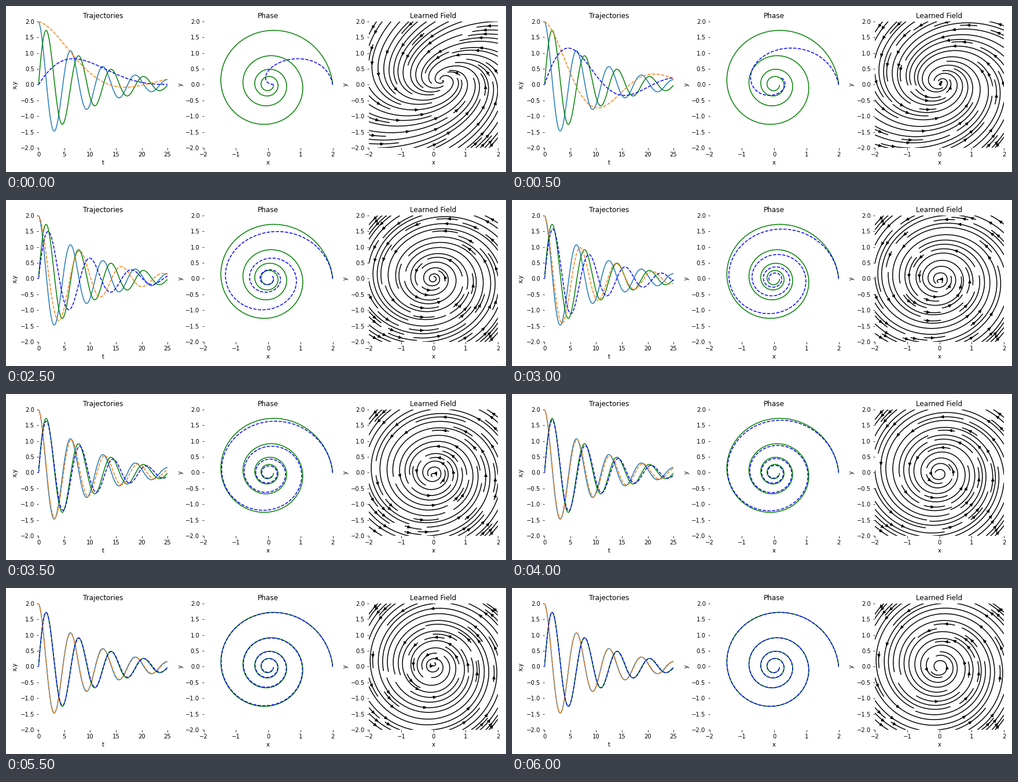
Recreate the animation shown at these times as a matplotlib script. Size 864 by 288 pixels, loop 6.5 s.

```python
import numpy as np
import matplotlib.pyplot as plt
from matplotlib.animation import FuncAnimation

plt.rcParams.update({
    "font.family": "DejaVu Sans",
    "font.size": 10,
    "axes.spines.left": False,
    "axes.spines.right": False,
    "axes.spines.top": False,
    "axes.spines.bottom": False,
})

FRAMES, INTERVAL = 13, 500
START = np.array([2.0, 0.0])
T = np.linspace(0, 25, 1000)

# Fit of the damped linear system as training goes on.
STEPS = np.array([0, 1, 3, 5, 7, 10, 12])
DECAY = [0.09, 0.087, 0.139, 0.103, 0.102, 0.102, 0.1]
OMEGA = [0.18, 0.288, 0.537, 0.779, 0.972, 0.993, 0.996]
CENTER_X = [0.28, 0.038, 0.034, 0, 0, 0, 0]
CENTER_Y = [0.15, 0.078, -0.01, 0, -0.01, 0.008, 0]
SIN_X = [0.62, 0.25, 0.2, 0.08, 0.03, 0.01, 0]
SIN_Y = [1.37, 1.68, 1.785, 1.82, 1.92, 1.985, 2]


def smooth(values, step):
    """Monotone cubic interpolation of values over STEPS."""
    v = np.asarray(values, float)
    h = np.diff(STEPS)
    d = np.diff(v) / h
    slope = np.zeros_like(v)
    slope[0], slope[-1] = d[0], d[-1]
    for k in range(1, len(v) - 1):
        if d[k - 1] * d[k] > 0:
            slope[k] = 2 * d[k - 1] * d[k] / (d[k - 1] + d[k])
    i = min(np.searchsorted(STEPS, step, side="right") - 1, len(h) - 1)
    u = (step - STEPS[i]) / h[i]
    return ((1 + 2 * u) * (1 - u) ** 2 * v[i]
            + u * (1 - u) ** 2 * h[i] * slope[i]
            + u ** 2 * (3 - 2 * u) * v[i + 1]
            + u ** 2 * (u - 1) * h[i] * slope[i + 1])


def system(decay, omega, center, sines):
    """Return the path from START and the matrix of the linear field."""
    mix = np.column_stack([START - center, sines])
    basis = np.exp(-decay * T) * np.array([np.cos(omega * T), np.sin(omega * T)])
    path = center[:, None] + mix @ basis
    spin = np.array([[-decay, -omega], [omega, -decay]])
    return path, mix @ spin @ np.linalg.inv(mix)


def learned(step):
    decay, omega, cx, cy, sx, sy = (
        smooth(p, step)
        for p in (DECAY, OMEGA, CENTER_X, CENTER_Y, SIN_X, SIN_Y))
    center = np.array([cx, cy])
    path, matrix = system(decay, omega, center, np.array([sx, sy]))
    return path, matrix, center


def style(ax, title, xlabel, ylabel, xlim):
    ax.set_title(title)
    ax.set_xlabel(xlabel)
    ax.set_ylabel(ylabel)
    ax.set_xlim(*xlim)
    ax.set_ylim(-2, 2)
    ax.set_yticks(np.arange(-2, 2.1, 0.5))


fig, (ax_traj, ax_phase, ax_field) = plt.subplots(
    1, 3, figsize=(12, 4), dpi=72, facecolor="white")
style(ax_traj, "Trajectories", "t", "x,y", (0, 25))
style(ax_phase, "Phase", "x", "y", (-2, 2))
style(ax_field, "Learned Field", "x", "y", (-2, 2))
ax_traj.set_xticks(range(0, 26, 5))
for ax in (ax_phase, ax_field):
    ax.set_xticks(range(-2, 3))
fig.tight_layout()

(true_x, true_y), _ = system(0.1, 1.0, np.zeros(2), np.array([0.0, 2.0]))
ax_traj.plot(T, true_x, "C0-", T, true_y, "g-")
ax_phase.plot(true_x, true_y, "g-")
line_x, line_y = ax_traj.plot(T, true_x, "C1--", T, true_y, "b--")
line_phase, = ax_phase.plot(true_x, true_y, "b--")

grid_y, grid_x = np.mgrid[-2:2:21j, -2:2:21j]


def draw_field(matrix, center):
    for artist in list(ax_field.collections) + list(ax_field.patches):
        artist.remove()
    offset = np.stack([grid_x - center[0], grid_y - center[1]])
    flow = np.tensordot(matrix, offset, axes=1)
    flow /= np.hypot(*flow) + 1e-9
    ax_field.streamplot(grid_x, grid_y, *flow, color="black")


def update(step):
    (x, y), matrix, center = learned(step)
    line_x.set_data(T, x)
    line_y.set_data(T, y)
    line_phase.set_data(x, y)
    draw_field(matrix, center)
    return []


anim = FuncAnimation(fig, update, frames=FRAMES, interval=INTERVAL,
                     repeat=True, repeat_delay=0)
plt.show()
```
